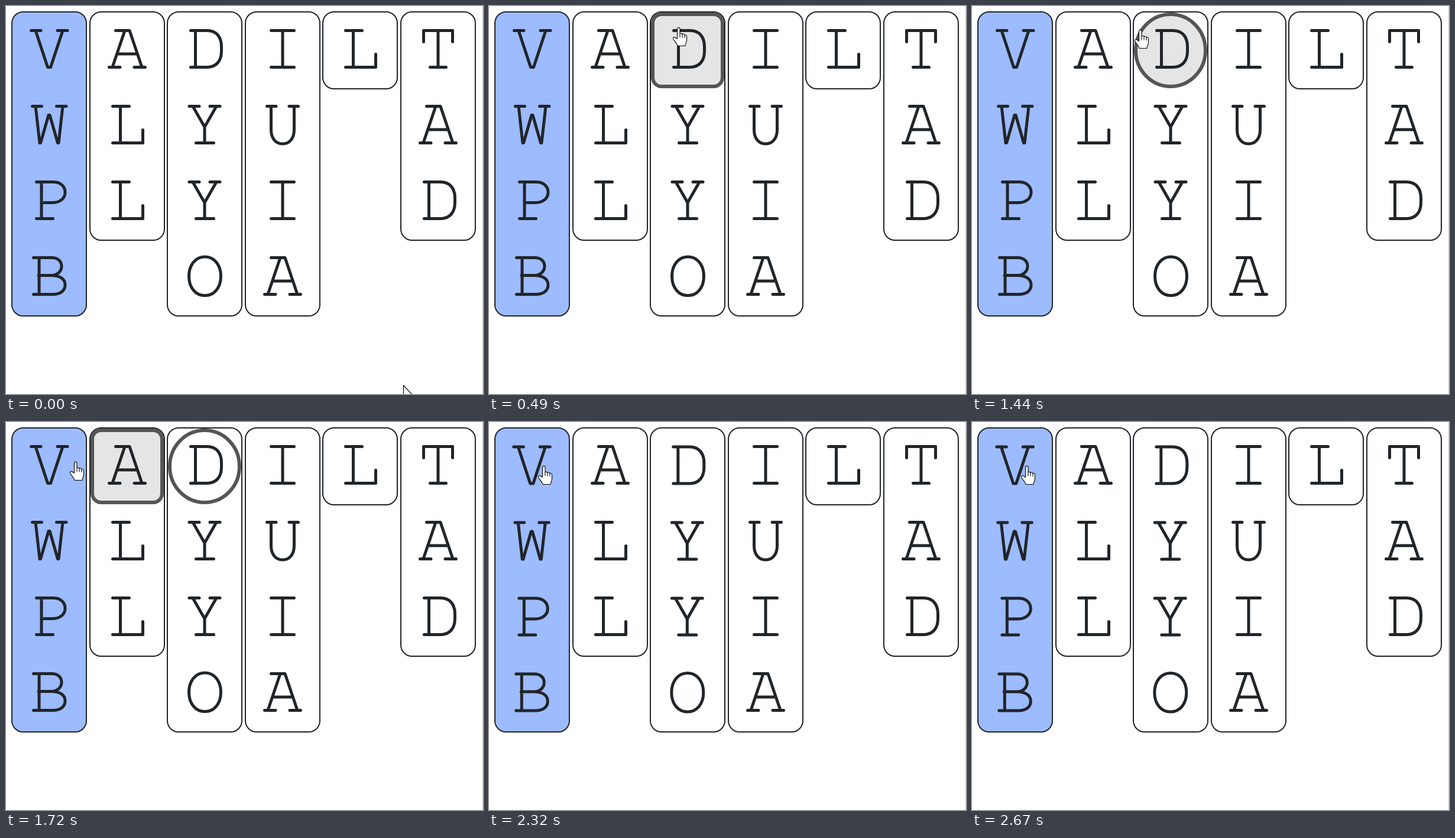
Animation of 807x656 px, one loop 2.74 s. Source, as an HTML page:

```html
<!DOCTYPE html>
<html lang="en">
<meta charset="utf-8">
<title>Column swap puzzle</title>
<style>
  html, body { margin: 0; width: 100%; height: 100%; overflow: hidden; background: #fff; }
  svg { display: block; }
  .column { fill: #fff; stroke: #212529; stroke-width: 2; }
  .active { fill: #9dbbff; }
  .mark { fill: none; stroke: #555; stroke-width: 6; }
  .hover { fill: rgba(0, 0, 0, .1); }
  .letter { fill: none; stroke: #212529; stroke-width: 5; stroke-linecap: round; stroke-linejoin: round; }
  .cursor { fill: #fff; stroke: #000; stroke-width: 1.1; stroke-linejoin: round; }
</style>
<svg id="stage" width="807" height="656" viewBox="0 0 807 656"></svg>
<script>
const LOOP = 2740, STEP = 70, CELL = 128;
const columns = ['VWPB', 'ALL', 'DYYO', 'IUIA', 'L', 'TAD'];

// Slab letters as strokes: x from the column centre, y from the cap line (0) to the baseline (62)
const glyphs = {
  A: 'M-19.5 0H4L25 62M-4 0L-25 62M-30.5 62H-12M12 62H30.5M-16 39.5H16',
  B: 'M-26.5 0H4C15 0 21 6 21 14.5S14 30 4 30H-18M4 30C18 30 27 36 27 46S19 62 6 62H-26.5M-17 0V62',
  D: 'M-23.5 0H4C20 0 28.5 11 28.5 27V35C28.5 51 20 62 4 62H-23.5M-15.5 0V62',
  I: 'M-19.5 0H19.5M0 0V62M-19.5 62H19.5',
  L: 'M-24.5 0H3.5M-11.5 0V62M-24.5 62H26.5V40',
  O: 'M.5 -1.5C16 -1.5 27.5 12 27.5 31.5S16 64 .5 64S-26.5 51 -26.5 31.5S-15 -1.5 .5 -1.5Z',
  P: 'M-21.5 0H6C19 0 27 7 27 17.5S18 35 6 35H-13M-13 0V62M-21.5 62H6.5',
  T: 'M-24.5 19V0H24.5V19M0 0V62M-13.5 62H13.5',
  U: 'M-26.5 0H-11M11 0H26.5M-19.5 0V40C-19.5 55 -11 63.5 0 63.5S19.5 55 19.5 40V0',
  V: 'M-30.5 0H-14M14 0H31M-23 0L-2.5 62H2.5L23 0',
  W: 'M-28.5 0H-12.5M12.5 0H29M-23 0L-16 62H-14.5L-1 15H1L14.5 62H16L23 0',
  Y: 'M-26 0H-9M9 0H26M-20 0L0 35L20 0M0 35V62M-14.5 62H15.5'
};
const arrow = 'M.5 .5V23.5L5.5 18.8L9.5 27L13 25.3L9.3 17.3H16.5Z';
const hand = 'M-2.5 19V2.5C-2.5 -.3 2 -.3 2 2.5V12C2 9.5 6 9.5 6 12.5C6 10.5 10 11 10 13.5' +
  'C10 12 13.5 12.5 13.5 15.5V22C13.5 26 11 28 11 31.5H-2C-3 27 -9 22 -9.5 18.5C-9.5 15.5 -5.5 16 -2.5 20' +
  'M2 12V17M6 12.5V17.5M10 13.5V18';

const pointerPath = [
  [672, 641], [620, 560], [520, 370], [395, 215], [373, 114], [345, 70], [326, 42], [321, 36],
  [312, 37], [285, 40], [245, 48], [195, 56], [150, 63], [118, 67], [102, 72], [96, 74], [93, 74]
];
const hop = [0, -6, -11, -6, 0];
const shake = [0, 0, 9, -9, 9, -9, 0];

const columnX = i => Math.round(9 + 131.6 * i);
const stepsSince = (t, start, count) =>
  Math.max(0, Math.min(count, Math.floor((t - start) / STEP) + 1));

function cellAt([x, y]) {
  const col = columns.findIndex((_, i) => x >= columnX(i) && x < columnX(i) + CELL);
  const row = Math.floor((y - 11) / CELL);
  return col >= 0 && row >= 0 && row < columns[col].length ? col + '-' + row : '';
}

function drawCell(letter, x, row, { hovered, selected, dy, lifted }) {
  const y = row * CELL + dy;
  const mark = hovered || selected
    ? `<rect class="mark ${hovered ? 'hover' : ''}" x="${x + 5}" y="${y + 14}" width="118" height="122"
        rx="${selected ? 59 : 15}" ry="${selected ? 61 : 15}"/>` : '';
  const nudge = lifted ? [-.7, .5] : [0, 0];
  return mark + `<path class="letter" role="img" aria-label="${letter}" d="${glyphs[letter]}"
    transform="translate(${x + 64 + nudge[0]} ${y + 41.5 + nudge[1]})"/>`;
}

function drawColumn(i, state) {
  const x = columnX(i), letters = [...columns[i]];
  const lifted = state.shaking && (i === 0 || i === 2);
  const cells = letters.map((letter, row) => {
    const id = i + '-' + row, picked = id === '2-0';
    return drawCell(letter, x, row, {
      hovered: id === state.hover,
      selected: picked && state.selected,
      dy: picked ? state.hop : 0,
      lifted
    });
  });
  return `<g transform="translate(${lifted ? state.shift : 0})">
    <rect class="column ${i ? '' : 'active'}" x="${x + 1}" y="10" width="126"
      height="${letters.length * CELL + 2}" rx="19"/>${cells.join('')}</g>`;
}

function draw(t) {
  const shakeStep = stepsSince(t, 2320, 6), shaking = shakeStep > 0;
  const move = stepsSince(t, 70, 7) + stepsSince(t, 1370, 8) + (t >= 1990 ? 1 : 0);
  // Hover styling trails the pointer by one step
  const under = cellAt(pointerPath[Math.max(0, move - 1)]);
  const state = {
    shaking,
    shift: shake[shakeStep],
    hover: shaking ? '' : under,
    selected: t >= 760 && !shaking,
    hop: hop[stepsSince(t, 760, 4)]
  };
  const order = shaking ? [1, 3, 4, 5, 0, 2] : [0, 1, 2, 3, 4, 5];
  const pointer = under && !(shakeStep > 1 && shakeStep < 6) ? hand : arrow;
  return '<rect x="806" width="1" height="656" fill="#ccc"/>' +
    order.map(i => drawColumn(i, state)).join('') +
    `<path class="cursor" d="${pointer}" transform="translate(${pointerPath[move]})"/>`;
}

const stage = document.getElementById('stage');
let shown = '';
function tick() {
  const picture = draw(performance.now() % LOOP);
  if (picture !== shown) stage.innerHTML = shown = picture;
  requestAnimationFrame(tick);
}
tick();
</script>
</html>
```
